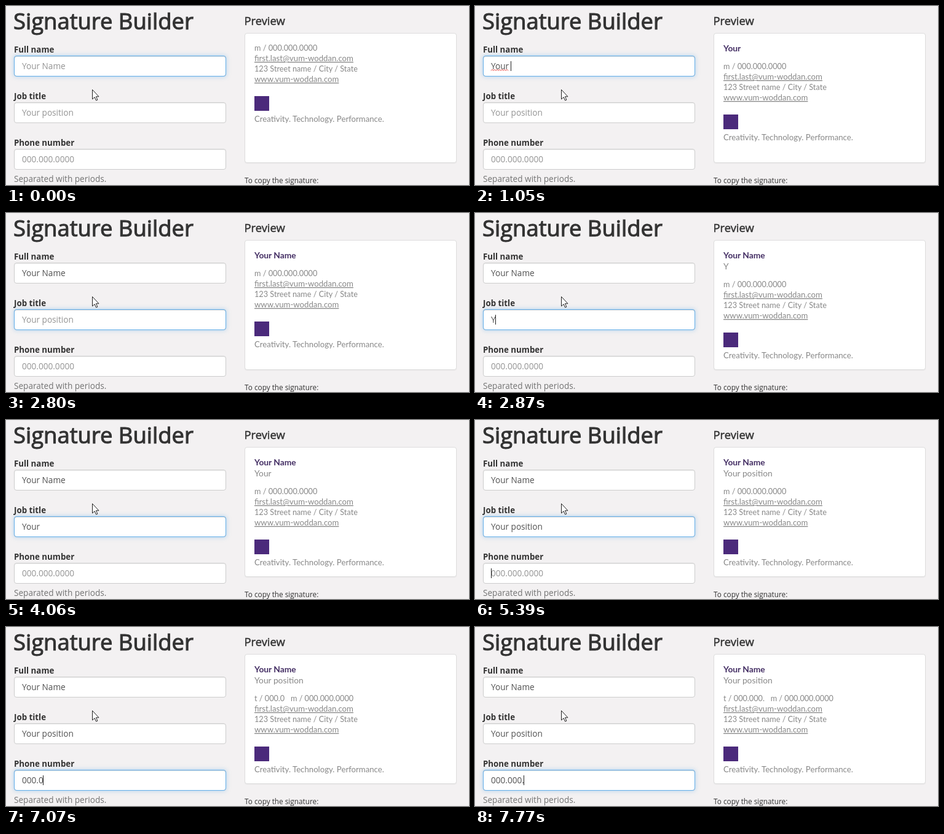
These frames come from a looping animation (753 by 292 pixels, 8000 ms). An HTML page:

```html
<!DOCTYPE html>
<html lang="en">
<head>
<meta charset="utf-8">
<title>Signature Builder</title>
<style>
  html, body { margin: 0; width: 100%; height: 100%; overflow: hidden; background: #f3f1f2; }
  .stage { position: relative; width: 753px; height: 292px; overflow: hidden; }
  .field, .panel { position: absolute; box-sizing: border-box; width: 345px; background: #fff; border-radius: 4px; }
  .field { left: 13px; height: 34px; border: 1px solid #ccc; box-shadow: inset 0 1px 1px rgba(0,0,0,.075); }
  .field::after {
    content: ""; position: absolute; inset: -1px; border: 1px solid #66afe9; border-radius: 4px;
    box-shadow: inset 0 1px 1px rgba(0,0,0,.075), 0 0 7px rgba(102,175,233,.5);
    opacity: var(--focus, 0);
  }
  .panel { left: 388px; top: 44px; height: 212px; border: 1px solid #ddd; box-shadow: 0 1px 1px rgba(0,0,0,.05); }
  svg { position: absolute; left: 0; top: 0; }
  text { white-space: pre; font: 13.6px "Open Sans", "Noto Sans", sans-serif; fill: #333; }
  /* The outline gives a medium weight. */
  .title, .heading { stroke: #333; }
  .title { font-size: 36.4px; stroke-width: 1.1px; }
  .heading { font-size: 18.4px; stroke-width: .5px; }
  .label { font-size: 13.3px; font-weight: 700; }
  .help { fill: #737373; }
  .note { font-size: 11.8px; }
  .entry { fill: #505050; }
  .entry.empty { fill: #939393; }
  .preview text { font: 13.2px Lato, "Open Sans", sans-serif; fill: #888; }
  .preview .name { font-size: 13.8px; font-weight: 700; fill: #432d63; }
  .preview .job { font-size: 13.8px; }
  .preview .compact { font-size: 12.7px; }
  .link { text-decoration: underline; }
  .wave { fill: none; stroke: #e8423c; stroke-width: 1; }
</style>
</head>
<body>
<div class="stage">
  <div class="field" style="top:81px"></div>
  <div class="field" style="top:157px"></div>
  <div class="field" style="top:233px"></div>
  <div class="panel"></div>
  <svg width="753" height="292">
    <text class="title" x="12" y="38">Signature Builder</text>
    <text class="label" x="13" y="76">Full name</text>
    <text class="label" x="13" y="152">Job title</text>
    <text class="label" x="13" y="228">Phone number</text>
    <text class="help" x="13" y="287">Separated with periods.</text>
    <text class="heading" x="387.5" y="31">Preview</text>
    <text class="note" x="388" y="289">To copy the signature:</text>

    <text class="entry" x="26" y="103"></text>
    <text class="entry" x="26" y="179"></text>
    <text class="entry" x="26" y="255"></text>
    <path class="wave"/>
    <rect id="caret" width="1" height="16" fill="#222"/>

    <g class="preview">
      <text class="name" id="name" x="404" y="74"></text>
      <text class="job" id="job" x="404" y="92"></text>
      <g id="contact">
        <text class="compact" id="phones" x="404" y="73"></text>
        <text class="link" x="404" y="90">first.last@vum-woddan.com</text>
        <text class="compact" x="404" y="107">123 Street name / City / State</text>
        <text class="link" x="404" y="124">www.vum-woddan.com</text>
        <rect x="404" y="147" width="24" height="24" fill="#4b2a7b"/>
        <text x="404" y="189">Creativity. Technology. Performance.</text>
      </g>
    </g>
    <path d="M140.5 136.5v15.5l3.6-3.3 2.5 5.4 2.3-1-2.5-5.3h4.6z" fill="#fff" stroke="#222"/>
  </svg>
</div>
<script>
  const LOOP = 8000, FADE = 140, STEP = 70;
  const PHONE = "000.000.0000";
  const $ = id => document.getElementById(id);
  const boxes = [...document.querySelectorAll(".field")];
  const entries = [...document.querySelectorAll(".entry")];
  const wave = document.querySelector(".wave");

  // One key-press time per character; focus and spelling marks are time spans.
  const fields = [
    { text: "Your Name", keys: [280, 420, 560, 700, 840, 1330, 1470, 1610, 1750],
      focus: [-FADE, 2170], spelling: [1050, 2170] },
    { text: "Your position", keys: [2870, 3360, 3430, 3570, 4130, 4340, 4410, 4550, 4620, 4690, 4830, 4900, 5040],
      focus: [2170, 5390], spelling: [4200, 5390] },
    { text: PHONE, keys: [6160, 6440, 6580, 6790, 7070, 7280, 7560, 7770],
      focus: [5390, Infinity], spelling: [Infinity, Infinity] }
  ];
  // [time, field holding the visible caret, or -1]
  const caretStops = [[0, -1], [280, 0], [2170, 1], [2800, -1], [2870, 1], [4060, -1],
                      [4130, 1], [5390, 2], [6020, -1], [6160, 2]];

  const ramp = (t, start) => Math.min(1, Math.max(0, Math.floor((t - start) / STEP) * STEP / FADE));
  const within = (t, [from, to]) => t >= from && t < to;

  wave.setAttribute("d", "M26 105.5" + "l2-2 2 2".repeat(7));

  function draw(t) {
    const typed = fields.map(f => f.text.slice(0, f.keys.filter(k => k <= t).length));

    fields.forEach((f, i) => {
      entries[i].textContent = typed[i] || f.text;
      entries[i].classList.toggle("empty", !typed[i]);
      boxes[i].style.setProperty("--focus", ramp(t, f.focus[0]) - ramp(t, f.focus[1]));
    });

    const marked = fields.findIndex(f => within(t, f.spelling));
    wave.style.display = marked < 0 ? "none" : "";
    wave.setAttribute("transform", `translate(0 ${Math.max(0, marked) * 76})`);

    const active = caretStops.filter(([time]) => time <= t).pop()[1];
    $("caret").style.display = active < 0 ? "none" : "";
    if (active >= 0) {
      const width = typed[active] ? entries[active].getComputedTextLength() : 0;
      $("caret").setAttribute("x", Math.floor(26 + width));
      $("caret").setAttribute("y", 90 + active * 76);
    }

    const [name, job, phone] = typed;
    $("name").textContent = name;
    $("job").textContent = job;
    $("phones").textContent = (phone ? `t / ${phone}   ` : "") + `m / ${PHONE}`;
    $("contact").setAttribute("transform", `translate(0 ${job ? 48 : name ? 30 : 0})`);
  }

  const start = performance.now();
  function tick() {
    draw((performance.now() - start) % LOOP);
    requestAnimationFrame(tick);
  }
  tick();
</script>
</body>
</html>
```
